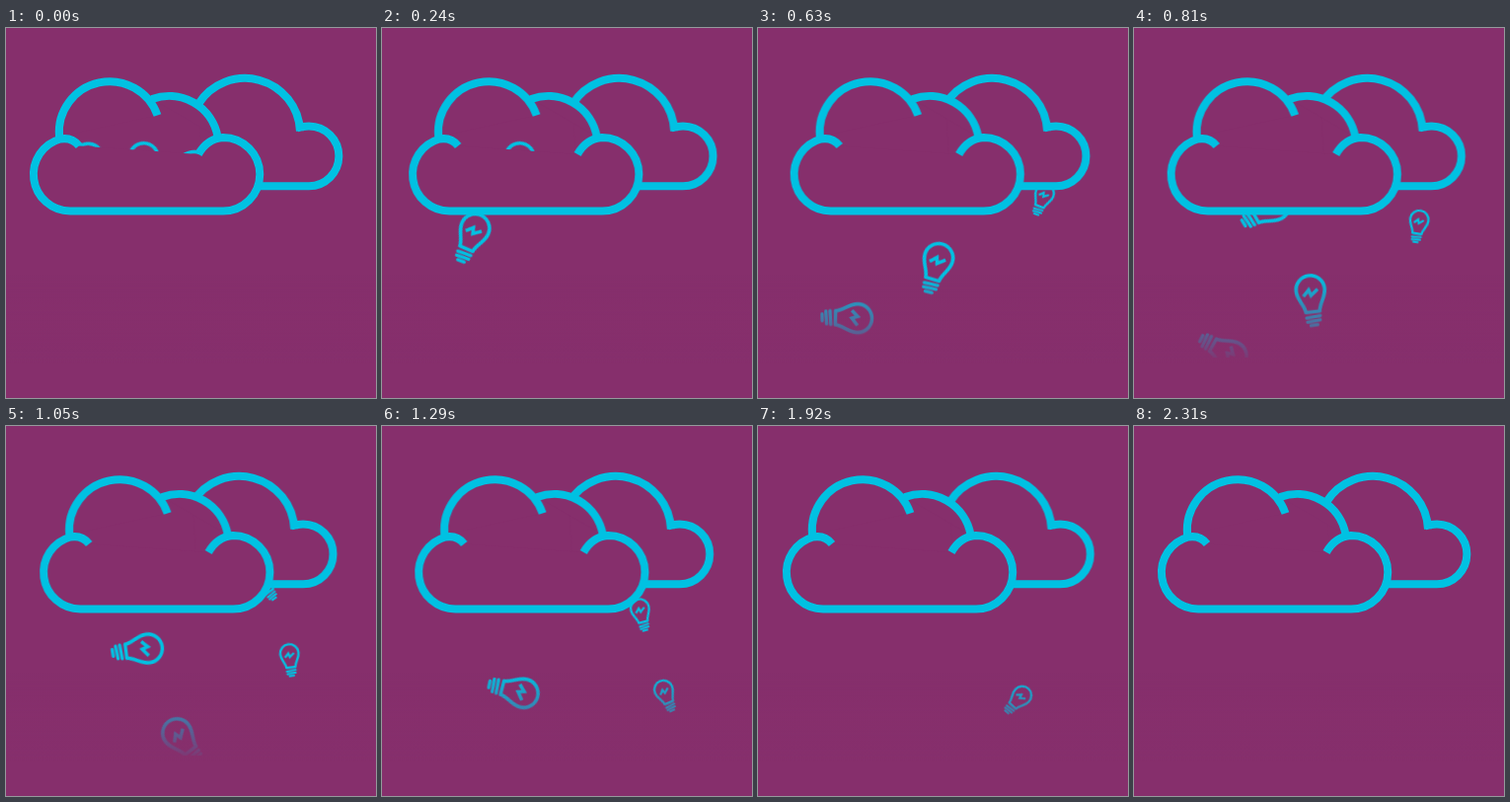
Write an HTML page that moves like this. It is 375 px wide and 375 px high and loops after 2400 ms.

```html
<!DOCTYPE html>
<html lang="en">
<head>
<meta charset="utf-8">
<title>Idea clouds</title>
<style>
  html, body { margin: 0; width: 100%; height: 100%; overflow: hidden; background: #862f6c; }
  svg { display: block; width: 100vw; height: 100vh; }
  .cloud { fill: #862f6c; }
  .line { stroke: #00c1e2; stroke-width: 8; }
  .bulb { fill: none; stroke: #00c1e2; stroke-width: 3.7; }
</style>
</head>
<body>
<svg viewBox="0 0 375 375">
  <defs>
    <clipPath id="ground"><rect width="375" height="334"/></clipPath>
    <linearGradient id="fade" x1="0" y1="0" x2="0" y2="1">
      <stop offset="0" stop-color="#862f6c" stop-opacity="0"/>
      <stop offset="1" stop-color="#862f6c"/>
    </linearGradient>
    <g id="shape">
      <path d="M-7 11.5C-8 3-14.5-2-14.5-11A14.5 14.5 0 0 1 14.5-11C14.5-2 8 3 7 11.5Z" stroke-linejoin="round"/>
      <path d="M-7.8-5L-1.8-11L0-5.2L7.3-10.8" stroke-width="3.4"/>
      <path d="M-7 17.2L7 16.2M-6.5 21.4L6.5 20.4M-3.5 25.2L3.5 24.8" stroke-width="3.2" stroke-linecap="round"/>
    </g>
  </defs>
  <g id="rain" clip-path="url(#ground)"></g>
  <rect y="250" width="375" height="90" fill="url(#fade)"/>
  <g id="back" class="cloud">
    <path d="M195 77A55.8 55.8 0 0 1 298 104.5L307 99.5A30.3 30.3 0 0 1 307 160.2H200Z"/>
    <path class="line" fill="none" d="M195 77A55.8 55.8 0 0 1 298 104.5M295 101.5Q301 99.5 307 99.5A30.3 30.3 0 0 1 307 160.2H235"/>
  </g>
  <g id="front" class="cloud">
    <path class="line" d="M74 119.5Q67 110.5 55 112.5A37.2 37.2 0 0 0 65 185.5H220A37.2 37.2 0 0 0 220 111Q204 112 195 128M148 72A50 50 0 0 1 214.5 110M54 110A51.3 51.3 0 0 1 153.5 88.5"/>
  </g>
</svg>
<script>
const LOOP = 2400, SWAY = 2340;
const TOP = 140, BOTTOM = 360;
const start = document.timeline.currentTime || 0;

const drops = [
  { x: 90, from: 0, to: 990, turn: [-38, 147], easing: 'cubic-bezier(.2, .38, .67, .72)' },
  { x: 180, from: 62, to: 1271, turn: [90, -66] },
  { x: 133, from: 546, to: 1825, turn: [37, 153] },
  { x: 288, from: 406, to: 1863, turn: [37, -61], size: .64 },
  { x: 263, from: 880, to: 2310, turn: [-48, 97], size: .64, easing: 'cubic-bezier(.33, .28, .8, .6)' }
];

function play(el, frames) {
  const anim = el.animate(frames, { duration: LOOP, iterations: Infinity });
  anim.startTime = start;
}

function fall({ x, from, to, turn, size = 1, easing = 'linear' }) {
  const el = document.createElementNS('http://www.w3.org/2000/svg', 'g');
  el.setAttribute('class', 'bulb');
  el.innerHTML = '<use href="#shape"/>';
  document.getElementById('rain').append(el);

  const pose = (y, angle) => `translate(${x}px, ${y}px) rotate(${angle}deg) scale(${size})`;
  const first = pose(TOP, turn[0]), last = pose(BOTTOM, turn[1]);
  play(el, [
    { offset: 0, transform: first },
    { offset: from / LOOP, transform: first, easing },
    { offset: to / LOOP, transform: last },
    { offset: 1, transform: last }
  ]);
}

function sway(id, dx) {
  const at = (ms, x) => ({ offset: ms / LOOP, transform: `translate(${x}px, 0px)`, easing: 'ease' });
  play(document.getElementById(id), [at(0, 0), at(SWAY / 2, dx), at(SWAY, 0), at(LOOP, 0)]);
}

drops.forEach(fall);
sway('back', -5.8);
sway('front', 10.3);
</script>
</body>
</html>
```
